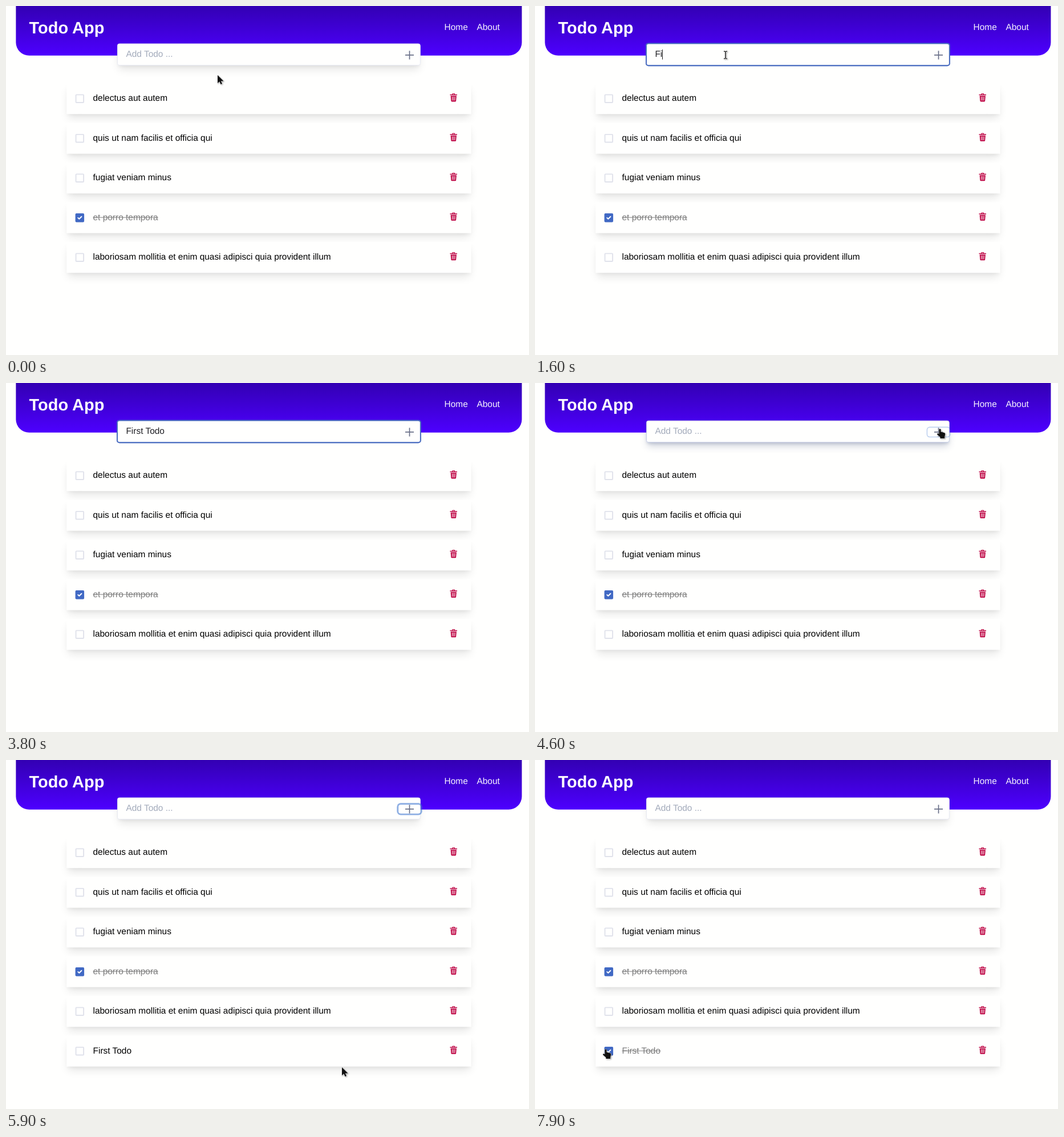
Write an HTML page that moves like this. It is 917 by 611 pixels and loops after 8 s.

```html
<!DOCTYPE html>
<html lang="en">
<head>
<meta charset="utf-8">
<title>Todo App</title>
<style>
  html, body { margin: 0; width: 100%; height: 100%; overflow: hidden; background: #fffffe; }
  * { box-sizing: border-box; }
  #app {
    position: absolute; left: 0; top: 0; width: 950px; height: 633px;
    transform: scale(.96526); transform-origin: 0 0;
    font: 16px/24px "Liberation Sans", Arial, sans-serif;
    text-rendering: geometricPrecision; white-space: nowrap; color: #000;
  }
  #app * { position: absolute; }
  header {
    left: 18px; top: 0; width: 919px; height: 90px; color: #f7f4ff;
    border-radius: 0 0 24px 24px; background: linear-gradient(#3300b3, #4d00ff);
  }
  h1 { left: 24px; top: 22.5px; margin: 0; font-size: 30px; line-height: 36px; color: #fff; }
  .home { left: 778.2px; top: 28px; }
  .about { left: 837.2px; top: 28px; }

  #list { left: 0; top: 0; }
  .row { left: 110px; width: 735px; height: 56px; background: #fffffe; }
  .row, #field {
    box-shadow: 0 10px 15px -3px rgba(0,0,0,.1), 0 4px 6px -2px rgba(0,0,0,.05);
  }
  .row span { left: 48px; top: 15.5px; }
  .box { left: 16px; top: 20px; width: 16px; height: 16px; border: 2px solid #e0e2eb; border-radius: 2px; }
  .tick { left: 16px; top: 20px; width: 16px; height: 16px; border-radius: 2px; background: #4169c4; opacity: 0; }
  .trash { left: 696.2px; top: 18px; width: 14px; height: 16px; }
  .done span { color: #7c7c7c; text-decoration: line-through; }
  .done .tick { opacity: 1; }

  #field { left: 202px; top: 68px; width: 551px; height: 39.5px; border: 1px solid #e6e8f2; border-radius: 4px; background: #fffffe; }
  #hint, #typed { left: 218px; top: 75.5px; }
  #hint { color: #a3abbb; }
  #typed { color: #1f1f24; white-space: pre; }
  #typed b { position: static; font-weight: 400; }
  #caret { top: 3px; width: 1px; height: 18px; background: #111; }
  #halo { left: 713px; top: 81px; width: 40px; height: 16px; border-radius: 4px; }
  #plus { left: 725px; top: 81px; width: 16px; height: 16px; }

  #menu {
    left: 202px; top: 108px; width: 324px; background: #fffffe;
    border-radius: 3px; box-shadow: 0 1px 4px rgba(0,0,0,.45);
    font: 500 14px/36px Roboto, "Noto Sans", sans-serif; color: #58585e;
  }
  #menu div { left: 12px; }

  #mouse { position: absolute; left: 0; top: 0; width: 40px; height: 40px; overflow: visible; filter: drop-shadow(1px 1px 1px rgba(0,0,0,.35)); }
  #mouse path { fill: #111; stroke: #fff; stroke-width: 1; stroke-linejoin: round; paint-order: stroke; }
</style>
</head>
<body>
<div id="app">
  <header>
    <h1>Todo App</h1>
    <span class="home">Home</span>
    <span class="about">About</span>
  </header>
  <div id="list"></div>
  <div id="field"></div>
  <div id="hint">Add Todo ...</div>
  <div id="typed"><b></b><i id="caret"></i></div>
  <div id="halo"></div>
  <svg id="plus" viewBox="0 0 16 16"><path d="M8 0V16M0 8H16" stroke="#6b7189" stroke-width="1.8"/></svg>
  <div id="menu"></div>
</div>
<svg id="mouse">
  <path id="arrow" d="M0 0V14.3L3.3 11.3 5.6 16.2 8 15.1 5.8 10.4H10.6Z"/>
  <path id="beam" d="M-3-7.2H-1L0-6.4 1-7.2H3V-6H.7V5.6H3V6.8H1L0 6-1 6.8H-3V5.6H-.7V-6H-3Z"/>
  <path id="hand" d="M-1.6 1.4Q0-1 1.6 1.4V5.6L7.6 7Q9.4 7.6 9.3 9.6L8.3 14.4V17H.4V14.8L-5 10Q-5.2 7.8-3 8.2L-1.6 9.2Z"/>
</svg>
<script>
const $ = id => document.getElementById(id);
const LOOP = 8000, STEP = 100;

const todos = [
  "delectus aut autem",
  "quis ut nam facilis et officia qui",
  "fugiat veniam minus",
  "et porro tempora",
  "laboriosam mollitia et enim quasi adipisci quia provident illum",
  "First Todo"
];
const suggestions = [
  "Backend Engineer", "asdasda", "asda",
  "External API Request with Proxy within Tarvio",
  "Funnel 3", "Funnel 1"
];

// [time, number of typed letters]
const typing = [[0, 0], [1400, 1], [1600, 2], [1800, 3], [2200, 5], [2400, 6],
  [2600, 7], [2800, 8], [2900, 9], [3000, 10], [4600, 0]];

const carets = [[0, 0], [700, 1], [3500, 0], [4000, 1], [4500, 0]];

// [time, x, y, shape]
const moves = [
  [0, 371, 121, "arrow"], [100, 367, 117, "arrow"], [200, 357, 106, "arrow"],
  [300, 341, 91, "beam"], [400, 335, 86, "beam"], [1400, 334, 86, "beam"],
  [3400, 290, 100, "beam"], [3500, 230, 130, "arrow"], [3600, 201, 160, "arrow"],
  [3700, 380, 176, "arrow"], [3800, 0, 0, ""], [3900, 690, 160, "arrow"],
  [4000, 770, 120, "arrow"], [4100, 735, 70, "arrow"], [4200, 678, 91, "beam"],
  [4300, 698, 83, "hand"], [4400, 710, 80, "hand"],
  [5100, 722, 92, "arrow"], [5200, 762, 118, "arrow"], [5300, 815, 155, "arrow"],
  [5400, 860, 205, "arrow"], [5500, 884, 265, "arrow"], [5600, 878, 330, "arrow"],
  [5700, 855, 388, "arrow"], [5800, 825, 432, "arrow"], [5900, 589, 538, "arrow"],
  [6300, 560, 547, "arrow"], [6400, 505, 552, "arrow"], [6500, 430, 550, "arrow"],
  [6600, 350, 538, "arrow"], [6700, 280, 522, "arrow"], [6800, 248, 514, "arrow"],
  [7000, 205, 509, "arrow"], [7100, 150, 504, "arrow"], [7200, 125, 513, "hand"],
  [7400, 130, 517, "hand"], [7500, 124, 515, "hand"], [7700, 124, 506, "hand"]
];

const at = (list, t) => list.filter(k => k[0] <= t).pop();
const ramp = (t, a, b) => Math.min(1, Math.max(0, (t - a) / (b - a)));
const mix = (a, b, k) => a + (b - a) * k;
const rgb = (a, b, k) => a.map((v, i) => Math.round(mix(v, b[i], k))).join();

$("list").innerHTML = todos.map((text, i) => `
  <div class="row${i === 3 ? " done" : ""}" style="top:${140 + 72 * i}px">
    <i class="box"></i>
    <svg class="tick" viewBox="0 0 16 16"><path d="M4.8 8.2 7 10.2 11.2 6" fill="none" stroke="#fff" stroke-width="2" stroke-linecap="round" stroke-linejoin="round"/></svg>
    <span>${text}</span>
    <svg class="trash" viewBox="0 0 14 16" fill="#bd0041">
      <path d="M.5 2.2H4.2L5 .6H9L9.8 2.2H13.5V3.8H.5ZM5.6 2.2H8.4L8.1 1.6H5.9Z" fill-rule="evenodd"/>
      <path d="M1.7 4.9H12.3L11.5 14.2Q11.4 15.4 10.2 15.4H3.8Q2.6 15.4 2.5 14.2ZM4 6.5 4.4 13.5H5.3L5 6.5ZM6.5 6.5V13.5H7.5V6.5ZM9 6.5 8.7 13.5H9.6L10 6.5Z" fill-rule="evenodd"/>
    </svg>
  </div>`).join("");
const added = $("list").lastElementChild;
const tick = added.querySelector(".tick");
const word = $("typed").firstElementChild;

let menuKey = null;
function showMenu(prefix, open) {
  const items = open ? suggestions.filter(s => s.startsWith(prefix)) : [];
  const key = items.join();
  if (key === menuKey) return;
  menuKey = key;
  $("menu").style.display = items.length ? "" : "none";
  $("menu").style.height = 36 * items.length + 17 + "px";
  $("menu").innerHTML = items.map((s, i) => `<div style="top:${8 + 36 * i}px">${s}</div>`).join("");
}

// The field's shadow morphs between a soft drop and a thin blue ring
function drawField(t) {
  const k = t < 4500 ? ramp(t, 600, 800) : .14 * ramp(t, 4800, 4600) + .86 * ramp(t, 4600, 4500);
  const hover = t >= 300 && t < 700;
  const blue = [68, 104, 190], soft = hover ? [212, 217, 230] : [230, 232, 242];
  const layer = (y, blur, spread, alpha) =>
    `0 ${mix(y, 0, k)}px ${mix(blur, 0, k)}px ${mix(spread, 1, k)}px rgba(${rgb([0, 0, 0], blue, Math.min(1, k * 4))},${mix(alpha, 1, k)})`;
  $("field").style.borderColor = `rgb(${rgb(soft, blue, Math.min(1, k * 1.6))})`;
  $("field").style.boxShadow = layer(10, 15, -3, .1) + "," + layer(4, 6, -2, .05);
}

function draw(t) {
  const text = todos[5].slice(0, at(typing, t)[1]);
  word.textContent = text;
  $("hint").style.display = text ? "none" : "";
  $("caret").style.opacity = at(carets, t)[1];
  showMenu(text, t >= 700 && t < 1600);
  drawField(t);

  const halo = ramp(t, 4420, 4740) * ramp(t, 6700, 6400);
  $("halo").style.boxShadow = `0 0 0 ${3 * halo}px rgba(67,122,210,${.6 * halo})`;

  added.style.display = t >= 5000 ? "" : "none";
  added.classList.toggle("done", t >= 7700);
  tick.style.opacity = ramp(t, 7600, 7900);

  const [, x, y, shape] = at(moves, t);
  $("mouse").style.transform = `translate(${x}px,${y}px)`;
  for (const id of ["arrow", "beam", "hand"]) $(id).style.display = id === shape ? "" : "none";
}

const start = performance.now();
function loop() {
  const t = (performance.now() - start) % LOOP;
  draw(Math.floor(t / STEP) * STEP);
  requestAnimationFrame(loop);
}
loop();
</script>
</body>
</html>
```
